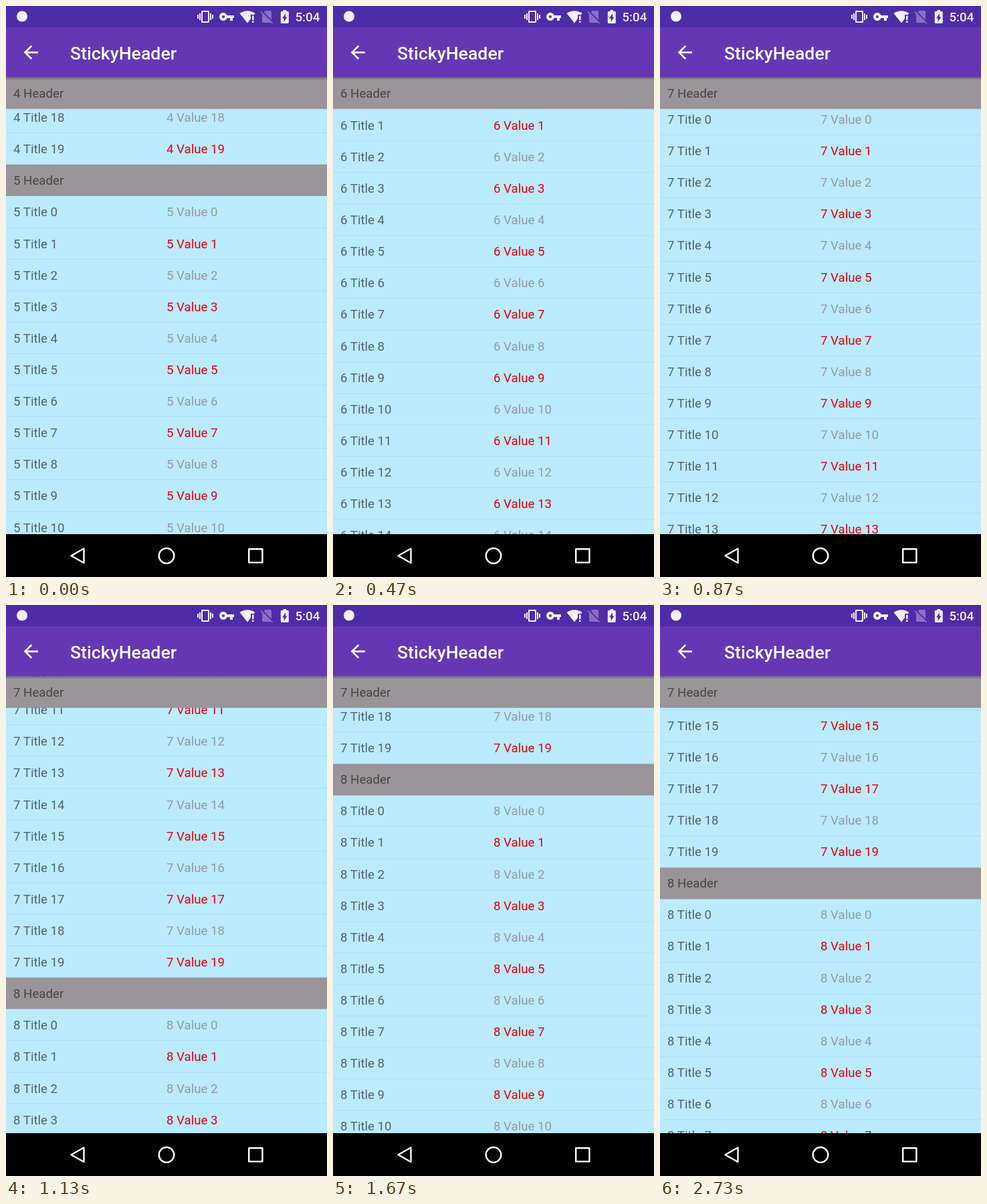
Animation, 480 px wide and 853 px high, one loop 2790 ms. Source, as an HTML page:

```html
<!DOCTYPE html>
<html lang="en">
<head>
<meta charset="utf-8">
<title>StickyHeader</title>
<style>
html, body { margin: 0; width: 100%; height: 100%; overflow: hidden; background: #000; }
body { position: relative; font: 18.67px/48.67px Roboto, sans-serif; }
#view { position: absolute; top: 0; left: 0; width: 480px; height: 789px; overflow: hidden; background: #bbebff; }
#list, #sticky { position: absolute; top: 0; left: 0; width: 480px; }
.row, .head { position: relative; box-sizing: border-box; height: 47.11px; padding-left: 11px; white-space: pre; }
.row { color: #536370; border-bottom: 1px solid #b1dcef; }
.row span { position: absolute; left: 240px; color: #949ba2; }
.row span.odd { color: #ec0006; }
.head { background: #999598; color: #474546; }
#sticky { height: 46.67px; }
svg { position: absolute; top: 0; left: 0; }
</style>
</head>
<body>
<div id="view">
  <div id="list"></div>
  <div id="sticky" class="head"></div>
</div>
<svg width="480" height="853" viewBox="0 0 480 853" fill="#fff">
  <defs>
    <linearGradient id="shade" x2="0" y2="1">
      <stop stop-opacity=".3"/>
      <stop offset="1" stop-opacity="0"/>
    </linearGradient>
  </defs>
  <rect y="106.67" width="480" height="4" fill="url(#shade)"/>
  <rect y="32" width="480" height="74.67" fill="#6537b5"/>
  <rect width="480" height="32" fill="#4f2ca7"/>

  <!-- status bar -->
  <g fill="#f3effa">
    <circle cx="24" cy="15.5" r="8"/>
    <path transform="translate(286 4)" d="M0 15h2V9H0zM3 17h2V7H3zM22 9v6h2V9zM19 17h2V7h-2zM16.5 3h-9C6.67 3 6 3.67 6 4.5v15c0 .83.67 1.5 1.5 1.5h9c.83 0 1.5-.67 1.5-1.5v-15c0-.83-.67-1.5-1.5-1.5zM16 19H8V5h8z"/>
    <path transform="translate(318 4)" d="M12.65 10C11.83 7.67 9.61 6 7 6c-3.31 0-6 2.69-6 6s2.69 6 6 6c2.61 0 4.83-1.67 5.65-4H17v4h4v-4h2v-4zM7 14c-1.1 0-2-.9-2-2s.9-2 2-2 2 .9 2 2-.9 2-2 2z"/>
    <path d="M349.5 11Q361 3.5 372.5 11L371 13H366V19L361 25.5ZM368 14.5h2.5v6.5H368zM368 22.5h2.5V25H368z"/>
    <path opacity=".35" transform="translate(378 4)" d="M18.99 5c0-1.1-.89-2-1.99-2h-7L7.66 5.34 19 16.68zM3.65 3.88L2.38 5.15 5 7.77V19c0 1.1.9 2 2 2h10.01c.35 0 .67-.1.96-.26l1.88 1.88 1.27-1.27z"/>
    <path transform="translate(402.4 4) scale(1.2 1)" d="M15.67 4H14V2h-4v2H8.33C7.6 4 7 4.6 7 5.33v15.33C7 21.4 7.6 22 8.33 22h7.33c.74 0 1.34-.6 1.34-1.33V5.33C17 4.6 16.4 4 15.67 4zM11 20v-5.5H9L13 7v5.5h2z"/>
    <text x="432.5" y="23" font-size="18.67" font-weight="500">5:04</text>
  </g>

  <!-- toolbar -->
  <path transform="translate(21.3 53.3) scale(1.333)" d="M20 11H7.83l5.59-5.59L12 4l-8 8 8 8 1.41-1.41L7.83 13H20z"/>
  <text x="96" y="79.5" font-size="26.67" font-weight="500">StickyHeader</text>

  <!-- navigation bar -->
  <rect y="789" width="480" height="64" fill="#000"/>
  <g fill="none" stroke="#fff" stroke-width="2.4" stroke-linejoin="round">
    <path d="M97.5 821.3L116.5 810.5V832Z"/>
    <circle cx="240" cy="821.3" r="11.3"/>
    <rect x="363.2" y="811.2" width="20.2" height="20.2"/>
  </g>
</svg>
<script>
const LOOP = 2790, TOP = 106.67, HEAD = 46.67, ROW = 47.11;
const SECTION = 21 * ROW, FIRST = 4, LAST = 8;
const list = document.getElementById('list');
const sticky = document.getElementById('sticky');

let html = '';
for (let s = FIRST; s <= LAST; s++) {
  html += `<div class="head">${s} Header</div>`;
  for (let i = 0; i < 20; i++) {
    html += `<div class="row">${s} Title ${i}<span class="${i % 2 ? 'odd' : ''}">${s} Value ${i}</span></div>`;
  }
}
list.innerHTML = html;

// Scroll offset that puts the header of section s at height y
const at = (s, y) => s * SECTION - y;

// [tick, offset, speed per tick]; 15 ticks per second
const keys = [
  [0, at(5, 237.2), 190],
  [4, at(6, 518.1), 160],
  [10, at(7, 596.2), 158],
  [17, at(8, 556.8), 85],
  [25, at(8, 237.7), 0],
  [35, at(8, 237.7), 0],
  [36, at(8, 282.1), -30],
  [41, at(8, 392.7), -12]
];

function scrollAt(tick) {
  let i = 0;
  while (i < keys.length - 2 && keys[i + 1][0] <= tick) i++;
  const [t0, p0, v0] = keys[i], [t1, p1, v1] = keys[i + 1];
  const d = t1 - t0, u = (tick - t0) / d, w = 1 - u;
  return w * w * ((1 + 2 * u) * p0 + u * d * v0) + u * u * ((3 - 2 * u) * p1 - w * d * v1);
}

function draw(now) {
  const ms = Math.floor((now % LOOP) / 10) * 10;
  const pos = scrollAt(Math.floor((ms + 3.4) * 0.015));
  const s = Math.floor((pos + TOP) / SECTION);
  const y = Math.min(TOP, (s + 1) * SECTION - pos - HEAD);
  list.style.transform = `translateY(${FIRST * SECTION - pos}px)`;
  sticky.style.transform = `translateY(${y}px)`;
  sticky.textContent = `${s} Header`;
  requestAnimationFrame(draw);
}
draw(performance.now());
</script>
</body>
</html>
```
